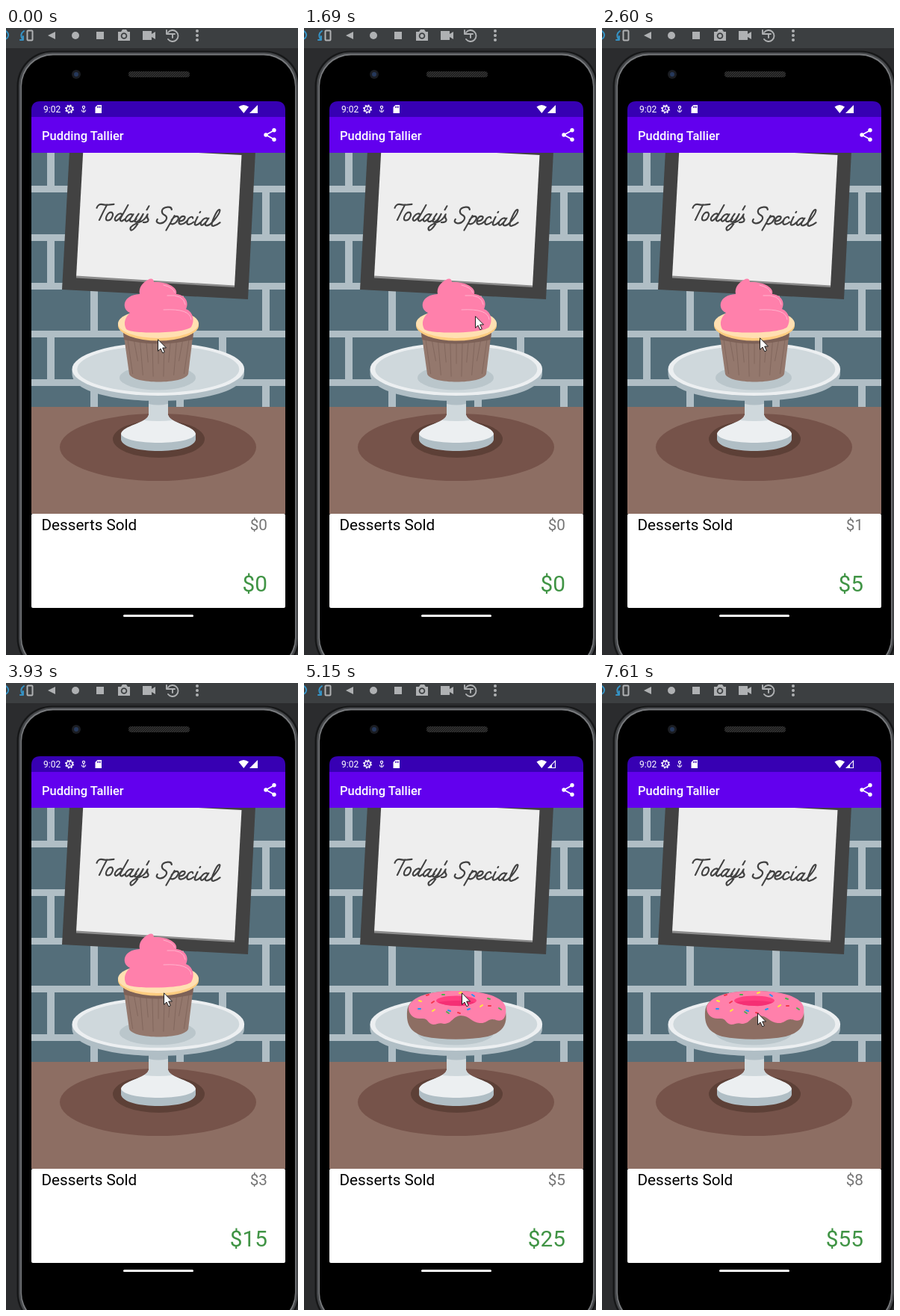
Recreate the animation shown at these times as an HTML page. Size 391 by 839 pixels, loop 8000 ms.

```html
<!DOCTYPE html>
<html lang="en">
<head>
<meta charset="utf-8">
<title>Pudding Tallier</title>
<style>
  html, body { margin: 0; width: 100%; height: 100%; overflow: hidden; background: #2b2c2e; }
  svg { display: block; width: 100%; height: 100%; }
  text { font-family: Roboto, "Open Sans", sans-serif; }
  .line { fill: none; stroke-linecap: round; stroke-linejoin: round; }
</style>
</head>
<body>
<svg viewBox="0 0 391 839" preserveAspectRatio="none">
  <defs>
    <clipPath id="view"><rect x="34" y="167" width="340" height="483"/></clipPath>
    <clipPath id="screen"><path d="M34 168V110Q34 98 46 98H362Q374 98 374 110V168Z"/></clipPath>
    <pattern id="mesh" width="3" height="3" patternUnits="userSpaceOnUse">
      <rect width="3" height="3" fill="#1c1c1c"/>
      <path d="M0 3L3 0" stroke="#454545" stroke-width=".8"/>
    </pattern>
  </defs>

  <!-- emulator toolbar -->
  <rect width="391" height="839" fill="#2b2c2e"/>
  <rect width="391" height="27" fill="#3c3f41"/>
  <g fill="#afb1b3">
    <path class="line" d="M0 4Q5 8 2 13L-2 16" stroke="#3592c4" stroke-width="2"/>
    <path class="line" d="M24 4Q18 8 22 15M19 16H23V11" stroke="#3592c4" stroke-width="2"/>
    <rect x="28.5" y="3.5" width="7" height="13" rx="1" fill="none" stroke="#afb1b3" stroke-width="2"/>
    <path d="M56 10L66 5V15Z"/>
    <circle cx="93" cy="10" r="5"/>
    <rect x="121" y="5" width="10" height="10"/>
    <path d="M150 5H154L156 2H161L163 5H166V17H150Z"/>
    <circle cx="158" cy="10.500" r="3.400" fill="none" stroke="#3c3f41" stroke-width="1.800"/>
    <path d="M183 4H195V8L200 5V15L195 12V16H183Z"/>
    <path class="line" d="M217 6A7.500 7.500 0 1 1 217 15M215 3V8H220M220 8H226M223 8V13" stroke="#afb1b3" stroke-width="1.900"/>
    <circle cx="256" cy="4" r="2"/><circle cx="256" cy="10" r="2"/><circle cx="256" cy="16" r="2"/>
  </g>

  <!-- phone body -->
  <rect x="14.500" y="30.500" width="379" height="833" rx="47" fill="#161718"/>
  <rect x="17" y="32.500" width="374" height="829" rx="45" fill="#45474a"/>
  <rect x="19.500" y="34.500" width="369" height="825" rx="43" fill="#77797c"/>
  <rect x="21" y="36.500" width="366" height="821" rx="42" fill="#000"/>
  <circle cx="94" cy="62" r="6" fill="#1b1d22"/>
  <circle cx="94" cy="62" r="3" fill="#26385a"/>
  <rect x="164" y="58" width="82" height="8" rx="4" fill="url(#mesh)"/>

  <!-- status and app bars -->
  <g clip-path="url(#screen)">
    <rect x="34" y="97" width="340" height="22" fill="#3700b3"/>
    <rect x="34" y="119" width="340" height="48" fill="#6200ee"/>
  </g>
  <text x="50" y="112.500" font-size="12" fill="#fff">9:02</text>
  <g fill="none" stroke="#fff">
    <circle cx="85" cy="108.500" r="4" stroke-width="1.500"/>
    <circle cx="85" cy="108.500" r="5.200" stroke-width="1.600" stroke-dasharray="2 2.080"/>
    <path d="M85 105V108.500L82 111M85 108.500L88 111" stroke-width="1"/>
    <circle cx="104" cy="106" r="1.600" stroke-width="1.100"/>
    <path d="M104 107V113M101.300 109.500Q101.300 112.500 104 112.500Q106.700 112.500 106.700 109.500" stroke-width="1"/>
  </g>
  <path d="M119.500 106L122.500 103H128V114H119.500Z" fill="#fff"/>
  <path d="M122.500 104.500V107M124.500 104.500V107M126.300 104.500V107" stroke="#3700b3"/>
  <path d="M311.500 105.500Q318 100.500 325 105.500L318.300 114Z" fill="#fff"/>
  <path d="M326 114L337 103V114Z" fill="#fff"/>
  <path id="weak" d="M332 109.500L335.900 105.600V112.900H332Z" fill="#3700b3"/>
  <text x="48" y="149.500" font-size="16.500" font-weight="500" fill="#fff">Pudding Tallier</text>
  <path d="M359 137L348 143L359 149" fill="none" stroke="#fff" stroke-width="1.700"/>
  <g fill="#fff"><circle cx="359" cy="136.700" r="2.700"/><circle cx="348" cy="143" r="2.700"/><circle cx="359" cy="149.300" r="2.700"/></g>

  <g clip-path="url(#view)">
    <rect x="34" y="167" width="340" height="340" fill="#546e7a"/>
    <g id="mortar" fill="#b0bec5"></g>
    <rect x="34" y="507" width="340" height="143" fill="#8d6e63"/>
    <ellipse cx="203.500" cy="561" rx="131.500" ry="45" fill="#76534a"/>
    <ellipse cx="204.500" cy="550" rx="61.500" ry="25" fill="#5d4037"/>

    <!-- sign -->
    <path d="M85.500 155L75 350L324 363L334.500 155Z" fill="#424242"/>
    <path d="M103.600 159L94 333L306 346L315.500 170Z" fill="#eee"/>
    <path d="M94.100 331.500L306 344.500V347L94 334.500Z" fill="#8b8b8b"/>
    <g class="line" role="img" aria-label="Today's Special" transform="translate(117 256.500) rotate(3) skewX(-6)" stroke="#424242" stroke-width="2.200">
      <path d="M2 -16Q3 -22 9 -21T24 -22M15 -21Q11 -10 8 0"/>
      <path d="M23 -11C17 -12 14 0 19 0C25 0 27 -11 22 -11"/>
      <path d="M37 -9C33 -13 27 -4 29 -1C31 2 36 -5 38 -10M43 -22L36 -4Q35 0 38 0L42 -3"/>
      <path id="a" d="M51 -9C47 -13 41 -4 43 -1C45 2 50 -5 52 -10L49 -4Q48 0 51 0Q54 0 57 -4"/>
      <path d="M59 -11Q53 0 57 0Q61 0 65 -11Q60 4 56 9Q52 14 51 9Q51 5 64 -1"/>
      <path d="M71 -22L69 -17M64 -1Q69 -4 71 -11Q70 -7 73 -4Q74 0 67 0"/>
      <path d="M102 -19Q101 -23 96 -22C86 -20 89 -13 94 -11C101 -8 95 1 88 0Q83 -1 85 -5"/>
      <path d="M107 -11L99 9M104 -5C109 -14 115 -10 112 -5C110 1 104 1 103 -1"/>
      <path d="M115 -4C122 -5 123 -11 119 -11C114 -11 112 0 117 0Q121 0 125 -5"/>
      <path d="M132 -9C131 -13 125 -9 125 -4C125 2 130 0 134 -4"/>
      <path d="M138 -11Q134 0 137 0Q140 0 143 -4M140 -17L140.500 -18"/>
      <use href="#a" x="101"/>
      <path d="M158 -4Q168 -18 166 -22Q163 -24 159 -8Q157 1 161 0Q165 -1 169 -5"/>
    </g>

    <!-- cake stand -->
    <path d="M191 490H217V518C220 529 252 532 254 544V551C250 571 158 571 154 551V544C156 532 188 529 191 518Z" fill="#b0bec5"/>
    <path d="M191 490H217V518C220 529 252 532 254 543C250 559 158 559 154 543C156 532 188 529 191 518Z" fill="#eceff1"/>
    <path d="M191 490H217V518Q219 523 223 525Q204 527 185 525Q190 522 191 518Z" fill="#cfd8dc"/>
    <path d="M191 490H217V503Q204 506 191 503Z" fill="#b0bec5"/>
    <path d="M88.500 457V463C90 511 317 511 319 463V457Z" fill="#b0bec5"/>
    <ellipse cx="203.800" cy="456.500" rx="115.300" ry="35.500" fill="#eceff1"/>
    <ellipse cx="203.800" cy="456.500" rx="108.500" ry="31.500" fill="#cfd8dc"/>
    <ellipse cx="203" cy="468" rx="51" ry="16.500" fill="#bac6cb"/>

    <g id="cupcake">
      <path d="M157 406H251L244 463C239 477 170 477 165 463Z" fill="#94786d"/>
      <g id="pleats" class="line" stroke="#82675d"></g>
      <path d="M157 408H251L250 417Q204 428 158 417Z" fill="#7d6157"/>
      <ellipse cx="204" cy="398" rx="54" ry="20.500" fill="#ffcc80"/>
      <ellipse cx="204" cy="395.500" rx="54" ry="19.500" fill="#ffe0b2"/>
      <path d="M179 356C177 347 184 340 190 337Q197 333 198 340C213 339 231 346 228 356C239 357 246 366 241 376C251 380 253 392 248 400C240 409 168 410 161 403C157 395 159 388 166 381C154 376 156 357 179 356Z" fill="#ff80ab"/>
      <path class="line" d="M211 344Q224 347 226 354M216 358Q238 356 240 370M211 377Q247 375 248 390" stroke="#ffb3cd"/>
    </g>

    <g id="donut">
      <path d="M138 440C139 419 170 412 204 412C238 412 269 419 270 440C273 459 264 468 246 473C220 478 186 478 161 473C143 467 137 458 138 440Z" fill="#8d6e63"/>
      <path d="M140 434C144 419 170 412 204 412C239 412 267 419 270 434C272 449 265 454 257 451C247 447 246 456 235 455C224 454 222 445 210 445C198 446 199 456 187 456C181 454 179 457 173 457C164 455 167 448 157 449C147 450 140 444 140 434Z" fill="#ff80ab"/>
      <ellipse cx="204" cy="425" rx="27" ry="6.500" fill="#ff4081"/>
      <path d="M179 427Q204 423 229 427Q220 433 204 432Q187 432 179 427Z" fill="#f52f74"/>
      <g id="sprinkles" class="line" stroke-width="2"></g>
    </g>
  </g>

  <!-- score panel -->
  <rect x="34" y="650" width="340" height="126" rx="2" fill="#fff"/>
  <text x="47.500" y="672" font-size="20.700" fill="#000">Desserts Sold</text>
  <text id="sold" x="350" y="672" font-size="20.700" fill="#757575" text-anchor="end">$0</text>
  <text id="total" x="350" y="754" font-size="29.750" fill="#409445" text-anchor="end">$0</text>
  <rect x="157" y="785" width="94" height="3" rx="1.500" fill="#fff"/>

  <path id="cursor" d="M.5 .8V16.300L4 13L6.800 18.800L9.300 17.600L6.700 12H11.500Z" fill="#fff" stroke="#1c1c1c"/>
</svg>
<script>
const LOOP = 8000, SWAP = 5150, SIGNAL_DROP = 4750;
const sales = [2600, 3030, 3930, 4600, 5150, 6460, 7050, 7610];
const moves = [ // time, x, y
  [0, 203, 416], [250, 158, 512], [370, 116, 593], [1150, 156, 524],
  [1300, 172, 489], [1420, 204, 438], [1540, 226, 405], [1690, 229, 385],
  [1840, 226, 381], [2120, 226, 384], [2240, 226, 389], [2360, 209, 409],
  [2480, 211, 414], [5780, 211, 424], [5930, 208, 441]
];

const $ = id => document.getElementById(id);
function add(parent, tag, attrs) {
  const el = document.createElementNS("http://www.w3.org/2000/svg", tag);
  for (const key in attrs) el.setAttribute(key, attrs[key]);
  $(parent).append(el);
}

for (let row = 0; row < 6; row++) {
  const y = Math.round(146.2 + row * 64.8);
  add("mortar", "rect", { x: 34, y, width: 340, height: 9 });
  for (let x = row % 2 ? 113 : 55; x < 374; x += 115)
    add("mortar", "rect", { x, y, width: 10, height: 65 });
}

for (let i = 0; i < 11; i++) {
  const x = 163 + i * 8.2, lean = (204 - x) * 0.16;
  const end = 467 - Math.abs(x - 204) * 0.11 - (i % 2) * 18;
  add("pleats", "path", { d: `M${x} 417L${x + lean} ${end}` });
}

[[154, 425, 0], [171, 428, 1], [185, 417, 2], [208, 415, 0], [225, 417, 3],
 [246, 422, 2], [236, 433, 0], [247, 432, 1], [219, 437, 3], [191, 440, 2],
 [193, 438, 3], [172, 439, 0], [153, 436, 3], [164, 418, 1], [261, 435, 2],
 [206, 441, 1]].forEach(([x, y, hue], i) => {
  const dy = [1, -2, 0, -1, 2][i % 5];
  add("sprinkles", "path", {
    d: `M${x} ${y}l3 ${dy}`,
    stroke: ["#ffeb3b", "#f4364c", "#4caf50", "#2196f3"][hue]
  });
});

const show = (id, on) => $(id).setAttribute("visibility", on ? "visible" : "hidden");

function draw(now) {
  const t = now % LOOP;
  const [, x, y] = moves.filter(m => m[0] <= t).pop();
  const n = sales.filter(s => s <= t).length;
  $("cursor").setAttribute("transform", `translate(${x} ${y})`);
  $("sold").textContent = "$" + n;
  $("total").textContent = "$" + (5 * n + 5 * Math.max(0, n - 5));
  show("cupcake", t < SWAP);
  show("donut", t >= SWAP);
  show("weak", t >= SIGNAL_DROP);
}

const start = performance.now();
function tick() {
  draw(performance.now() - start);
  requestAnimationFrame(tick);
}
tick();
</script>
</body>
</html>
```
